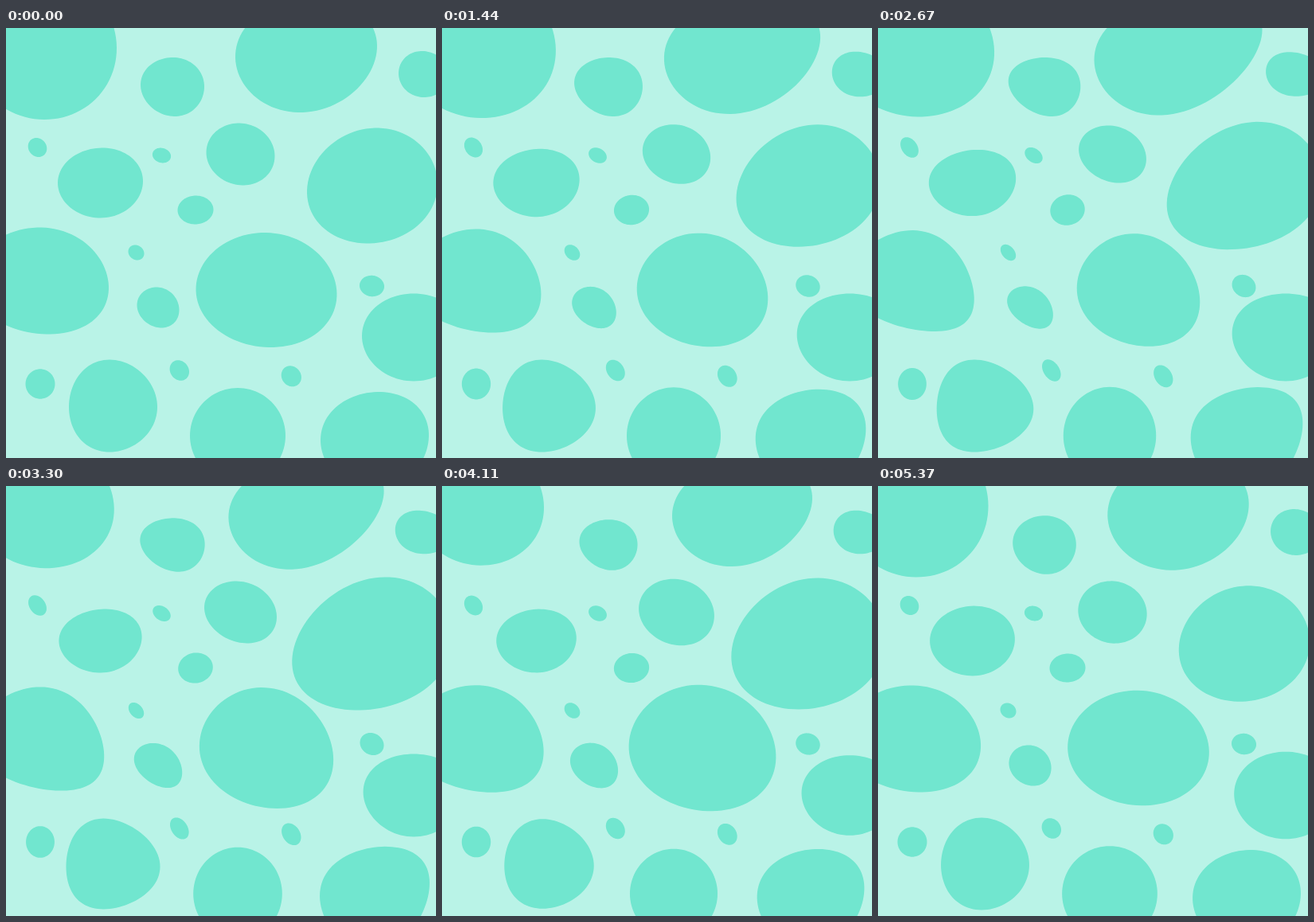
Write an HTML page with a canvas that moves like this. It is 540 px wide and 540 px high and loops after 5400 ms.

```html
<!DOCTYPE html>
<html lang="en">
<head>
<meta charset="utf-8">
<title>Drifting blobs</title>
<style>
  html, body { margin: 0; width: 100%; height: 100%; overflow: hidden; background: #b9f3e7; }
  canvas { display: block; width: 100vw; height: 100vh; }
</style>
</head>
<body>
<canvas id="stage" width="540" height="540"></canvas>
<script>
const ctx = document.getElementById('stage').getContext('2d');
const LOOP = 5400, STEP = 30, TURN = 2 * Math.PI, SIDES = 96;
const MORPHED = 2010;   // when the end radii are reached
const blobs = [];

const mix = (a, b, u) => a + (b - a) * u;
const wave = t => (1 - Math.cos(TURN * t / LOOP)) / 2;

// An ellipse at x, y whose radii change from rx, ry to endRx, endRy.
// lean tilts it, egg fattens its right side, sag lowers its left and right tips,
// swell is how much it grows in the second half of the loop.
function blob(x, y, rx, ry, endRx, endRy, { lean = 0, egg = 0, sag = 0, swell = 0 }) {
  blobs.push({ x, y, rx, ry, endRx, endRy, lean, egg, sag, swell });
}

// Small ones all get a little narrower and taller.
const pebble = (x, y, rx, ry, lean) => blob(x, y, rx, ry, rx * .97, ry * 1.06, { lean });

blob(47, 22, 92, 93, 98, 90, { lean: .04, sag: .05, swell: -.15 });
blob(209, 74, 40, 37, 44.5, 37, { lean: .08, egg: .1, sag: -.1, swell: -.14 });
blob(377, 34, 89, 72, 103, 75, { lean: -.23, sag: -.16, swell: -.09 });
blob(525, 58, 32, 29, 37, 28, { lean: .1, egg: -.1, swell: -.04 });
blob(118.5, 194.5, 53.5, 44, 54.5, 42, { lean: -.06, egg: .05, sag: -.06, swell: -.07 });
blob(294.5, 158.5, 43, 39, 42.5, 36.5, { lean: .15, egg: .03, swell: .11 });
blob(460, 198, 82, 72.5, 95, 79, { lean: -.17, sag: .1, swell: .085 });
blob(42, 317.5, 87, 67, 80, 64, { lean: .16, egg: .16, sag: .16, swell: .03 });
blob(327, 329, 88.5, 72, 79, 71, { lean: .11, egg: .04, sag: .08, swell: .11 });
blob(512, 388.5, 65, 55, 67, 55, { sag: -.08, swell: -.085 });
blob(191, 351, 26.5, 25.5, 28.5, 26.5, { lean: .3, egg: .1, swell: .09 });
blob(134.5, 474.5, 55.5, 58, 60, 58, { egg: -.2, sag: .06, swell: -.03 });
blob(291, 512, 60, 60, 58.5, 61, { swell: -.07 });
blob(463, 519, 68, 62, 70, 67, { lean: -.12, egg: .06, sag: -.18, swell: -.025 });

pebble(39.5, 150, 11.8, 12, .3);
pebble(195.5, 160, 11.6, 9.4, .3);
pebble(238, 228.5, 22.5, 18, -.05);
pebble(163.5, 282, 10, 9.5, .35);
pebble(459.5, 324, 15.5, 13.2, .12);
pebble(43, 447, 18.5, 18.7, 0);
pebble(217.8, 430, 12.2, 12.8, .35);
pebble(358.3, 437.3, 12.6, 13, .28);

function drawBlob(b, t) {
  const u = wave(t) / wave(MORPHED);
  const size = 1 + b.swell * Math.max(0, -Math.sin(TURN * t / LOOP));
  const rx = mix(b.rx, b.endRx, u) * size, ry = mix(b.ry, b.endRy, u) * size;
  const odd = mix(.4, 1, u);   // every blob gets less regular on the way
  for (let i = 0; i < SIDES; i++) {
    const a = TURN * i / SIDES;
    ctx[i ? 'lineTo' : 'moveTo'](
      b.x + rx * Math.cos(a - odd * (b.lean / 2 + b.egg * Math.sin(a))),
      b.y + ry * Math.sin(a + odd * (b.lean / 2 + b.sag * Math.cos(a))));
  }
  ctx.closePath();
}

function draw(now) {
  const t = Math.floor(now % LOOP / STEP) * STEP;
  ctx.fillStyle = '#b9f3e7';
  ctx.fillRect(0, 0, 540, 540);
  ctx.fillStyle = '#71e6cf';
  ctx.beginPath();
  blobs.forEach(b => drawBlob(b, t));
  ctx.fill();
}

const began = performance.now();
function tick() {
  draw(performance.now() - began);
  requestAnimationFrame(tick);
}
tick();
</script>
</body>
</html>
```
